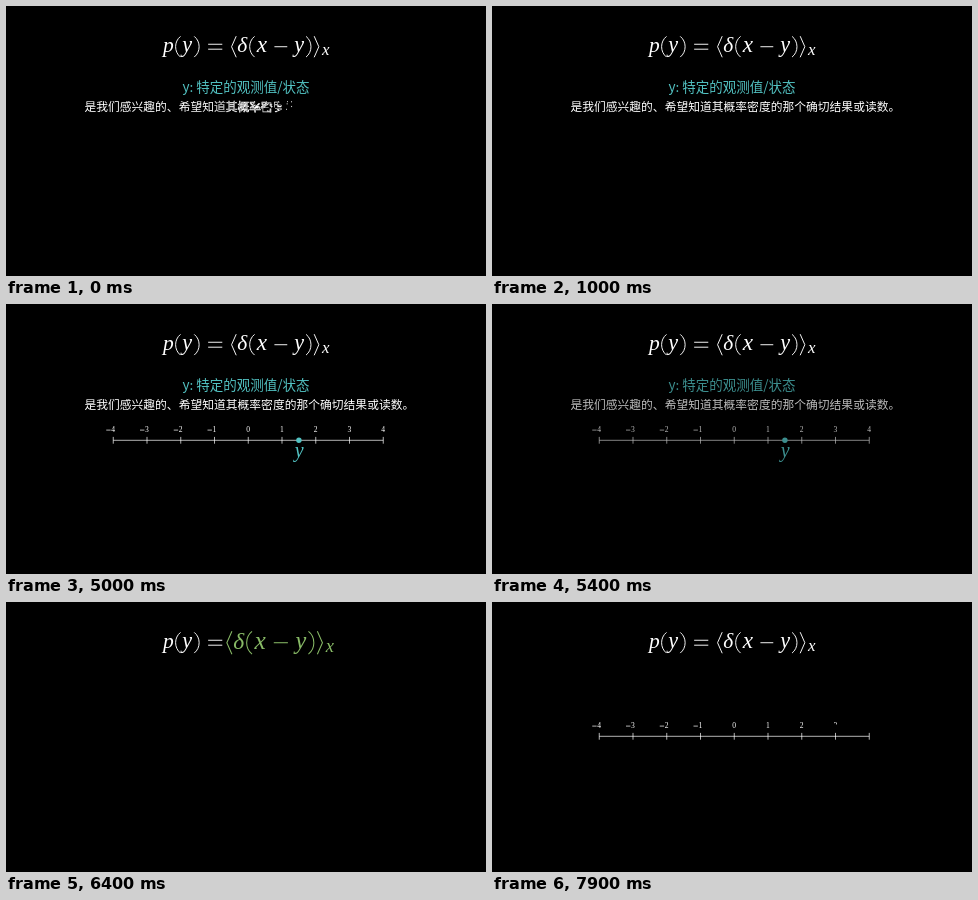
These frames come from a looping animation (480 by 270 pixels, 8000 ms). An HTML page:

```html
<!DOCTYPE html>
<html lang="zh-CN">
<head>
<meta charset="utf-8">
<title>p(y)</title>
<style>
  html, body { margin: 0; width: 100%; height: 100%; overflow: hidden; background: #000; }
  svg { display: block; width: 100vw; height: 100vh; }
  text { font-family: "Noto Sans CJK SC", "Noto Sans CJK", sans-serif; }
  .math { font-family: "Liberation Serif", serif; font-style: italic; text-anchor: middle; }
  .upright { font-style: normal; }
  .ink { fill: #fff; }
  .rule { fill: none; stroke: #fff; stroke-width: .95; }
  .teal { fill: #52c2c2; }
  .note { fill: #fff; stroke: #fff; stroke-width: 0; font-size: 11.77px; }
  .axis { fill: none; stroke: #fff; stroke-width: .7; }
  .digit { font-size: 7.6px; }
</style>
</head>
<body>
<svg id="stage" viewBox="0 0 480 270">
  <g id="left"></g>
  <g id="right"></g>
  <g id="details">
    <text class="teal" x="240" y="86" font-size="13.5" text-anchor="middle">y: 特定的观测值/状态</text>
    <text class="note" id="note" x="78.4" y="105.4"></text>
    <g id="marked">
      <g id="axis1" transform="translate(242.25 136.3)"></g>
      <circle class="teal" cx="292.9" cy="136.2" r="2.7"/>
      <text class="math teal" x="293.3" y="152.8" font-size="20">y</text>
    </g>
  </g>
  <g id="axis2" transform="translate(242.25 134.3)"></g>
</svg>
<script>
const LOOP = 8000, STEP = 100;
const UNIT = 33.75, EM = 21.1, ORIGIN = { x: 157, y: 46 };
const INK = [255, 255, 255], ACCENT = [131, 183, 95];
const NOTE = '是我们感兴趣的、希望知道其概率密度的那个确切结果或读数。';

const $ = id => document.getElementById(id);
const clamp = v => Math.min(1, Math.max(0, v));
const mix = (a, b, k) => a + (b - a) * k;
const phase = (t, start, length) => clamp((t - start) / length);

// Normalised sigmoid easing
const sigmoid = v => 1 / (1 + Math.exp(-v));
const smooth = v => {
  const edge = sigmoid(-5);
  return clamp((sigmoid(10 * (clamp(v) - .5)) - edge) / (1 - 2 * edge));
};

function add(parent, tag, attrs, content = '') {
  const node = document.createElementNS('http://www.w3.org/2000/svg', tag);
  for (const key in attrs) node.setAttribute(key, attrs[key]);
  node.textContent = content;
  parent.append(node);
  return node;
}

// Formula parts take em units from the start of the baseline
const px = x => ORIGIN.x + x * EM;
const py = y => ORIGIN.y - y * EM;
const at = (x, y) => `${px(x)} ${py(y)} `;

function glyph(parent, char, x, size = 1, y = 0) {
  add(parent, 'text', { class: 'math ink', x: px(x), y: py(y), 'font-size': size * EM }, char);
}
function rule(parent, ...points) {
  const d = points.map(([x, y]) => at(x, y)).join('L');
  add(parent, 'path', { class: 'rule', d: 'M' + d });
}
function paren(parent, x, side) {
  const tip = x + .12 * side, belly = x - .19 * side;
  const d = `M${at(tip, .74)}C${at(belly, .5)}${at(belly, 0)}${at(tip, -.24)}`;
  add(parent, 'path', { class: 'rule', d });
}

function buildFormula() {
  const left = $('left'), right = $('right');
  glyph(left, 'p', .25, 1.02);
  paren(left, .71, 1);
  glyph(left, 'y', 1.15, 1.05);
  paren(left, 1.6, -1);
  for (const y of [.367, .133]) rule(left, [2.14, y], [2.81, y]);

  rule(right, [3.47, .75], [3.25, .25], [3.47, -.25]);
  glyph(right, 'δ', 3.76, 1.02);
  paren(right, 4.22, 1);
  glyph(right, 'x', 4.69, 1.1);
  rule(right, [5.28, .25], [5.89, .25]);
  glyph(right, 'y', 6.45, 1.05);
  paren(right, 6.9, -1);
  rule(right, [7.165, .75], [7.385, .25], [7.165, -.25]);
  glyph(right, 'x', 7.71, .8, -.15);
}

function buildAxis(root) {
  const parts = [];
  const stroke = (x1, y1, x2, y2) => {
    const node = add(root, 'line', { class: 'axis', x1, y1, x2, y2, pathLength: 1 });
    parts.push(p => node.setAttribute('stroke-dasharray', `${p} 2`));
  };
  const digit = (x, value) => {
    const node = add(root, 'text', { class: 'math upright ink digit', x, y: -8.3 }, value);
    parts.push(p => {
      node.style.clipPath = p === 1 ? 'none' : `inset(0 0 ${p ? 78 * (1 - p) : 100}% 0)`;
    });
  };
  const values = Array.from({ length: 9 }, (_, i) => i - 4);

  stroke(-4 * UNIT, 0, 4 * UNIT, 0);
  for (const v of values) stroke(v * UNIT, 3.4, v * UNIT, -3.4);
  for (const v of values) {
    const x = v * UNIT;
    if (v < 0) stroke(x - 7, -10.2, x - 2.6, -10.2);
    digit(x, Math.abs(v));
  }
  // Parts are drawn one after another
  return k => parts.forEach((draw, i) => draw(smooth(k * parts.length - i)));
}

// Outline first, then fill
function write(node, k) {
  const outline = clamp(2 * k), fill = clamp(2 * k - 1);
  node.style.fillOpacity = fill;
  node.style.strokeWidth = outline ? .68 * (1 - fill) : 0;
  node.style.strokeDasharray = outline < 1 ? `${outline * 36} 999` : 'none';
}

buildFormula();
buildAxis($('axis1'))(1);
const drawAxis = buildAxis($('axis2'));
const chars = [...NOTE].map(char => add($('note'), 'tspan', {}, char));

function drawNote(k) {
  const lag = 4 / (chars.length + 1);
  const value = k * ((chars.length - 1) * lag + 1);
  chars.forEach((node, i) => write(node, clamp(value - i * lag)));
}

function highlight(k) {
  const amount = smooth(1 - Math.abs(2 * k - 1));
  const color = `rgb(${INK.map((c, i) => Math.round(mix(c, ACCENT[i], amount)))})`;
  const right = $('right');
  right.setAttribute('transform',
    `translate(275 40.7) scale(${1 + .1 * amount}) translate(-275 -40.7)`);
  for (const node of right.children) {
    node.style[node.tagName === 'text' ? 'fill' : 'stroke'] = color;
  }
}

function render(t) {
  drawNote(phase(t, -1000, 2000));
  $('marked').style.opacity = smooth(phase(t, 1000, 1500));
  $('details').style.opacity = 1 - smooth(phase(t, 5000, 1000));
  highlight(phase(t, 6000, 1000));
  drawAxis(phase(t, 7045, 920));
}

const start = performance.now();
function tick() {
  const elapsed = (performance.now() - start + 20) % LOOP;
  render(Math.floor(elapsed / STEP) * STEP);
  requestAnimationFrame(tick);
}
tick();
</script>
</body>
</html>
```
